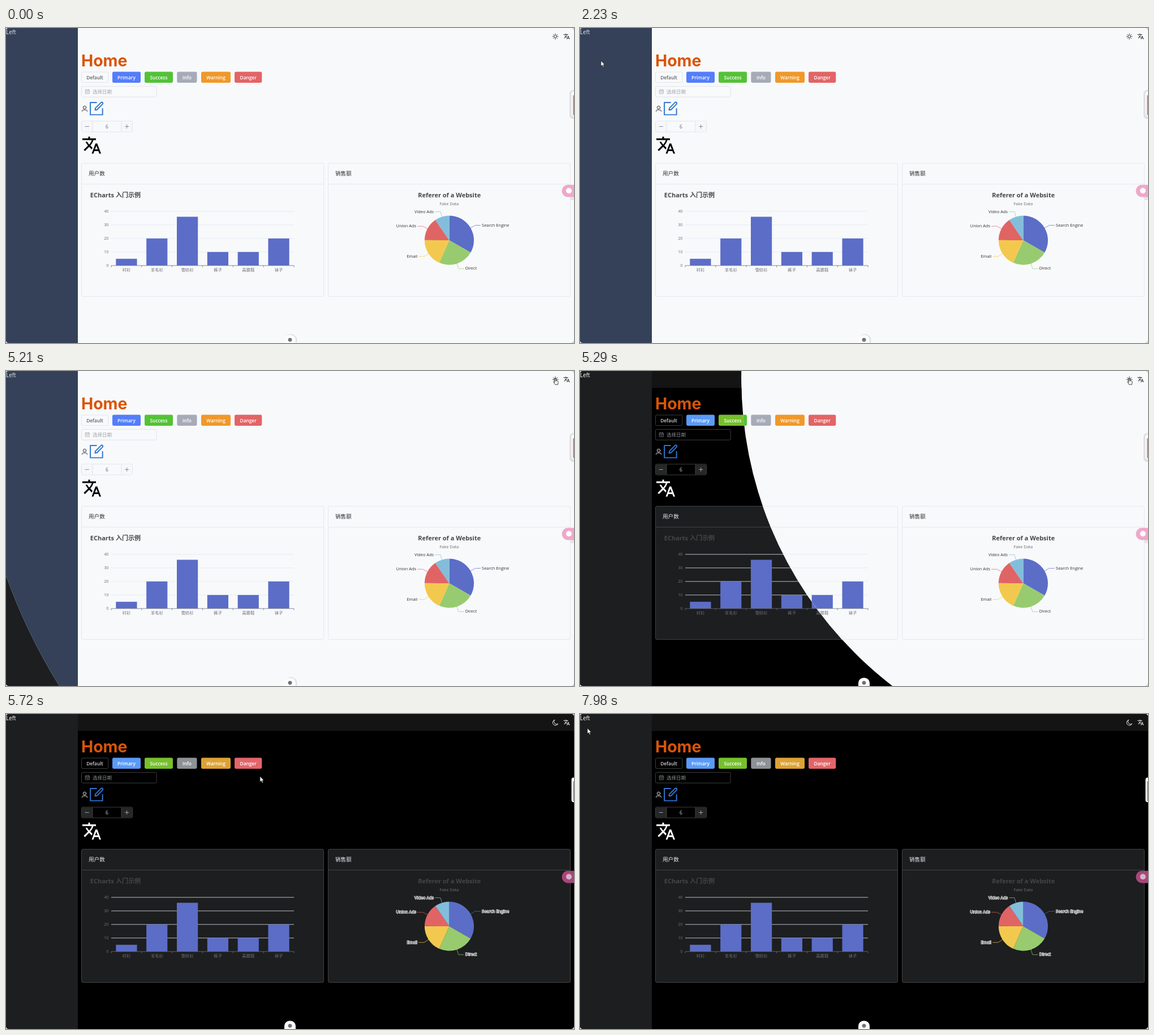
An HTML page for the animation above (8 s loop, 1004x558 px).

```html
<!DOCTYPE html>
<html lang="zh">
<head>
<meta charset="utf-8">
<title>Theme switch</title>
<style>
html, body { margin: 0; width: 100%; height: 100%; overflow: hidden; background: #e9ebef; }
#stage { position: relative; width: 1004px; height: 558px; overflow: hidden; border-radius: 5px; }
svg { position: absolute; left: 0; top: 0; }
text { font-family: "Open Sans", "Noto Sans CJK SC", "Noto Sans CJK", sans-serif; }

.light {
  --bg: #f8f9fb; --side: #344158; --head: #f8f9fb; --left: #e3e6eb;
  --card: #f8f9fb; --line: #e6e8ed; --edge: #dcdfe6; --cell: #f5f7fa;
  --text: #606266; --strong: #303133; --icon: #303133; --big: #000; --hint: #a0a3aa;
  --primary: #537dfb; --success: #54c237; --info: #a7abb8; --warning: #f0982a; --danger: #e36466;
  --title: #464646; --grid: #e2e7f0; --halo: none; --pill: #efa8ca; --dot: #fff;
}
.dark {
  --bg: #000; --side: #1d1e20; --head: #141414; --left: #fff;
  --card: #1d1e1f; --line: #414243; --edge: #4c4d4f; --cell: #262727;
  --text: #cfd3dc; --strong: #e5eaf3; --icon: #e8e8e8; --big: #fff; --hint: #8d9095;
  --primary: #5a9bf8; --success: #76c02c; --info: #8e9196; --warning: #dda235; --danger: #e46569;
  --title: #464646; --grid: #e0e6f1; --halo: #fff; --pill: #a5477b; --dot: #d9b3c8;
}
.light .moon, .dark .sun, .dark .shade { display: none; }
.c { text-anchor: middle; }
.r { text-anchor: end; }
.axis { font-size: 7.4px; fill: #6e7079; }
.title { font-size: 11px; font-weight: 700; fill: var(--title); }
.btn { font-size: 8.3px; font-weight: 600; fill: #fff; }
.label { font-size: 7.4px; fill: #333; stroke: var(--halo); stroke-width: 1.3px; paint-order: stroke; stroke-linejoin: round; }
.box { fill: var(--bg); stroke: var(--edge); }
.o { fill: none; stroke-linecap: round; stroke-linejoin: round; }

.light { animation: shrink 8s infinite; }
@keyframes shrink {
  0%, 65.124% { clip-path: circle(1200px at 971px 15px); }
  65.125% { clip-path: circle(1036px at 971px 15px); animation-timing-function: cubic-bezier(.144, .24, .631, 1); }
  69.7%, 100% { clip-path: circle(0 at 971px 15px); }
}

#cursor { animation: move 8s linear infinite, show 8s step-end infinite; }
.arrow { animation: arrow 8s step-end infinite; }
.hand { animation: hand 8s step-end infinite; }
@keyframes show {
  0% { visibility: hidden; }
  5.125% { visibility: visible; }
  47.375% { visibility: hidden; }
  49.25%, 100% { visibility: visible; }
}
@keyframes arrow { 0% { opacity: 1; } 51.25% { opacity: 0; } 68.125%, 100% { opacity: 1; } }
@keyframes hand { 0% { opacity: 0; } 51.25% { opacity: 1; } 68.125%, 100% { opacity: 0; } }
@keyframes move {
  0%, 5.125% { transform: translate(437px, 30px); }
  6.25% { transform: translate(330px, 23px); }
  8.125% { transform: translate(160px, 40px); }
  10.625% { transform: translate(80px, 62px); }
  14.375%, 15.375% { transform: translate(48px, 82px); }
  17.5% { transform: translate(85px, 95px); }
  20% { transform: translate(102px, 125px); }
  22.5% { transform: translate(92px, 147px); }
  24.75%, 25.5% { transform: translate(85px, 126px); }
  26.75% { transform: translate(62px, 95px); }
  27.875% { transform: translate(37px, 58px); }
  30% { transform: translate(6px, 15px); }
  31.875% { transform: translate(30px, 40px); }
  33.625%, 36.625% { transform: translate(12px, 24px); }
  39.375% { transform: translate(2px, 9px); }
  42.5% { transform: translate(20px, 14px); }
  44.5% { transform: translate(148px, 27px); }
  45.125% { transform: translate(732px, 39px); }
  45.75% { transform: translate(915px, 57px); }
  46.375% { transform: translate(968px, 66px); }
  47%, 49.249% { transform: translate(983px, 70px); }
  49.25% { transform: translate(996px, 26px); }
  52.5% { transform: translate(985px, 18px); }
  55% { transform: translate(975px, 13px); }
  57.75%, 68.125% { transform: translate(971px, 13px); }
  70% { transform: translate(880px, 45px); }
  71.5% { transform: translate(451px, 110px); }
  72.5% { transform: translate(280px, 138px); }
  75%, 75.625% { transform: translate(138px, 151px); }
  78.75% { transform: translate(90px, 170px); }
  81.25% { transform: translate(52px, 195px); }
  83.125% { transform: translate(100px, 206px); }
  85.5%, 86.125% { transform: translate(105px, 200px); }
  88.125% { transform: translate(123px, 230px); }
  90.625% { transform: translate(80px, 251px); }
  93.125% { transform: translate(45px, 160px); }
  96.125%, 96.75% { transform: translate(28px, 64px); }
  99.75%, 100% { transform: translate(13px, 25px); }
}
</style>
</head>
<body>
<div id="stage">
  <svg class="dark" width="1004" height="558"></svg>
  <svg class="light" width="1004" height="558"></svg>
  <svg width="1004" height="558">
    <g id="cursor" stroke="#111" stroke-width=".8" fill="#fff" stroke-linejoin="round">
      <path class="arrow" d="M0 0V10L2.3 8L4 11.8L5.7 11L4.1 7.4H7.1Z"/>
      <path class="hand" d="M-.9 .7Q0-.7 .9 .7V4L4 4.7Q5.3 5.2 5.1 6.6L4.5 11H-.3L-3 7Q-2.6 5.8-.9 7.2Z"/>
    </g>
  </svg>
</div>
<script>
const rect = (x, y, w, h, attrs) => `<rect x="${x}" y="${y}" width="${w}" height="${h}" ${attrs}/>`;
const text = (x, y, str, attrs) => `<text x="${x}" y="${y}" ${attrs}>${str}</text>`;
const path = (d, attrs) => `<path d="${d}" ${attrs}/>`;
const fill = name => `fill="var(--${name})"`;

const TRANSLATE = 'M12.87 15.07l-2.54-2.51.03-.03A17.5 17.5 0 0 0 14.07 6H17V4h-7V2H8v2H1v2h11.17' +
  'C11.5 7.92 10.44 9.75 9 11.35 8.07 10.32 7.3 9.19 6.69 8h-2c.73 1.63 1.73 3.17 2.98 4.56' +
  'l-5.09 5.02L4 19l5-5 3.11 3.11zM18.5 10h-2L12 22h2l1.12-3h4.75L21 22h2zm-2.62 7l1.62-4.33L19.12 17z';

function layout() {
  return rect(0, 0, 1004, 558, fill('bg')) +
    rect(127, 0, 877, 30, fill('head')) +
    rect(0, 0, 127, 558, fill('side')) +
    text(0, 10.7, 'Left', `font-size="9.9" ${fill('left')}`) +
    text(133, 68, 'Home', 'font-size="28.4" font-weight="700" fill="#d95508" style="font-family:Inter,sans-serif"');
}

function headerIcons() {
  let rays = '';
  for (let i = 0; i < 8; i++) {
    const c = Math.cos(i * Math.PI / 4), s = Math.sin(i * Math.PI / 4);
    rays += `M${971 + 4 * c} ${15 + 4 * s}L${971 + 5.1 * c} ${15 + 5.1 * s}`;
  }
  return `<g class="o" stroke="var(--icon)" stroke-width="1">
      <g class="sun"><circle cx="971" cy="15" r="2.5"/>${path(rays, '')}</g>
      ${path('M969.6 10.4A5 5 0 1 0 975.8 17.3A4.7 4.7 0 0 1 969.6 10.4Z', 'class="moon"')}
    </g>` +
    path(TRANSLATE, `transform="translate(985 9) scale(.5)" ${fill('icon')}`);
}

function controls() {
  const buttons = [['Primary', 188, 50], ['Success', 245, 50], ['Info', 302.3, 35.2], ['Warning', 345, 52], ['Danger', 404, 48.3]];
  return rect(133.5, 78, 47.3, 18.6, 'class="box" rx="2.2" stroke-width=".8"') +
    text(157, 90.6, 'Default', `class="btn c" style="fill:var(--text)"`) +
    buttons.map(([name, x, w]) =>
      rect(x, 77.6, w, 19.4, `rx="2.4" ${fill(name.toLowerCase())}`) +
      text(x + w / 2, 90.6, name, 'class="btn c"')).join('') +
    rect(133.5, 103.4, 132.6, 18.8, 'class="box" rx="2.2" stroke-width=".8"') +
    path('M140.6 109.7h6.8v6.6h-6.8zM140.6 112h6.8M142.3 108.7v1.8M145.7 108.7v1.8M142.3 114h3.4', 'class="o" stroke="var(--hint)" stroke-width=".7"') +
    text(153, 115.8, '选择日期', `font-size="8.5" ${fill('hint')}`) +
    `<g class="o" stroke-width="76" stroke="var(--icon)" transform="translate(132.7 136.9) scale(.0123)">
      <circle cx="512" cy="320" r="220"/>${path('M160 896v-96a128 128 0 0 1 128-128h448a128 128 0 0 1 128 128v96', '')}</g>` +
    `<g class="o" stroke-width="64" stroke="#2f76d2" transform="translate(144.2 127.2) scale(.0306)">
      ${path('M512 160H160V864H864V512M434 590l20-110L779 154a64 64 0 0 1 90 90L544 574z', '')}</g>` +
    rect(133.5, 165, 90, 19, 'class="box" rx="2.2" stroke-width=".8"') +
    rect(134, 165.4, 19, 18.2, `rx="1.8" ${fill('cell')}`) +
    rect(204, 165.4, 19, 18.2, `rx="1.8" ${fill('cell')}`) +
    path('M153 165v19M204 165v19', 'stroke="var(--edge)" stroke-width=".8"') +
    path('M140 174.5h6.4M210.5 174.5h6.4M213.7 171.3v6.4', 'class="o" stroke="var(--text)" stroke-width=".7"') +
    text(178.5, 177.6, '6', `class="c" font-size="8.5" ${fill('text')}`) +
    path(TRANSLATE, `transform="translate(133.5 189.5) scale(1.5)" ${fill('big')}`);
}

function card(x, name) {
  return rect(x, 239.5, 428, 236, `rx="2.5" ${fill('card')} stroke="var(--line)"`) +
    path(`M${x} 276.5h428`, 'stroke="var(--line)"') +
    text(x + 12.5, 261.2, name, `font-size="9.6" font-weight="500" ${fill('strong')}`);
}

function barChart() {
  const data = [['衬衫', 5], ['羊毛衫', 20], ['雪纺衫', 36], ['裤子', 10], ['高跟鞋', 10], ['袜子', 20]];
  const left = 186, base = 420.8, band = 53.83, unit = 2.4;
  let out = text(148.8, 300.3, 'ECharts 入门示例', 'class="title"');
  for (let v = 0; v <= 40; v += 10) {
    const y = base - v * unit;
    if (v) out += path(`M${left} ${y}H509`, 'stroke="var(--grid)" stroke-width=".8"');
    out += text(181.6, y + 2.2, v, 'class="axis r"');
  }
  let ticks = `M${left} ${base}H509`;
  for (let i = 0; i <= 6; i++) ticks += `M${left + i * band} ${base}v3`;
  data.forEach(([name, v], i) => {
    const mid = left + (i + .5) * band;
    out += rect(mid - 18.6, base - v * unit, 37.2, v * unit, 'fill="#5b6dc7"') +
      text(mid, 431, name, 'class="axis c"');
  });
  return out + path(ticks, 'stroke="#6e7079" stroke-width=".8"');
}

function pieChart() {
  const data = [
    ['Search Engine', 1048, '#5b6dc7'], ['Direct', 735, '#98cb6f'], ['Email', 580, '#f2c94e'],
    ['Union Ads', 484, '#e16465'], ['Video Ads', 300, '#82bedc']
  ];
  const total = data.reduce((sum, d) => sum + d[1], 0);
  const at = (a, r) => [783.5 + r * Math.sin(a), 376 - r * Math.cos(a)];
  const R = 43.6;
  let a = 0;
  let out = text(783.7, 300.3, 'Referer of a Website', 'class="title c"') +
    text(783.5, 314, 'Fake Data', 'class="axis c"');
  for (const [name, value, color] of data) {
    const end = a + value / total * 2 * Math.PI, mid = (a + end) / 2;
    const side = mid < Math.PI ? 1 : -1;
    const [x, y] = at(mid, R + 9.3);
    out += path(`M783.5 376L${at(a, R)}A${R} ${R} 0 0 1 ${at(end, R)}Z`, `fill="${color}"`) +
      path(`M${at(mid, R)}L${x} ${y}h${side * 9.3}`, `class="o" stroke="${color}" stroke-width=".7"`) +
      text(x + side * 11.8, y + 2.1, name, `class="label${side < 0 ? ' r' : ''}"`);
    a = end;
  }
  return out;
}

function floating() {
  return rect(996, 110, 16, 51, 'class="shade" rx="6" fill="#dfe1e5"') +
    rect(999.6, 112.6, 12, 43.6, 'rx="4" fill="#fff"') +
    path('M1003 119.5v34.5', 'stroke="#dc4f55" stroke-width="1.8" stroke-dasharray="1.6 .5"') +
    rect(997, 290, 10, 15, 'class="shade" rx="2" fill="#e3e5e9"') +
    rect(982.6, 277.8, 40, 21.6, `rx="10.8" ${fill('pill')}`) +
    `<circle cx="995" cy="288.3" r="5" ${fill('dot')}/>` +
    '<circle class="shade" cx="503.4" cy="553" r="11" fill="#dfe1e5"/>' +
    rect(492, 543.6, 20, 24, 'rx="9" fill="#fcfcfc"') +
    '<circle cx="502" cy="552.3" r="3.4" fill="#6f7276"/>';
}

const page = layout() + headerIcons() + controls() +
  card(133.5, '用户数') + card(569.5, '销售额') +
  barChart() + pieChart() + floating();
for (const theme of ['.dark', '.light']) document.querySelector(theme).innerHTML = page;
</script>
</body>
</html>
```
